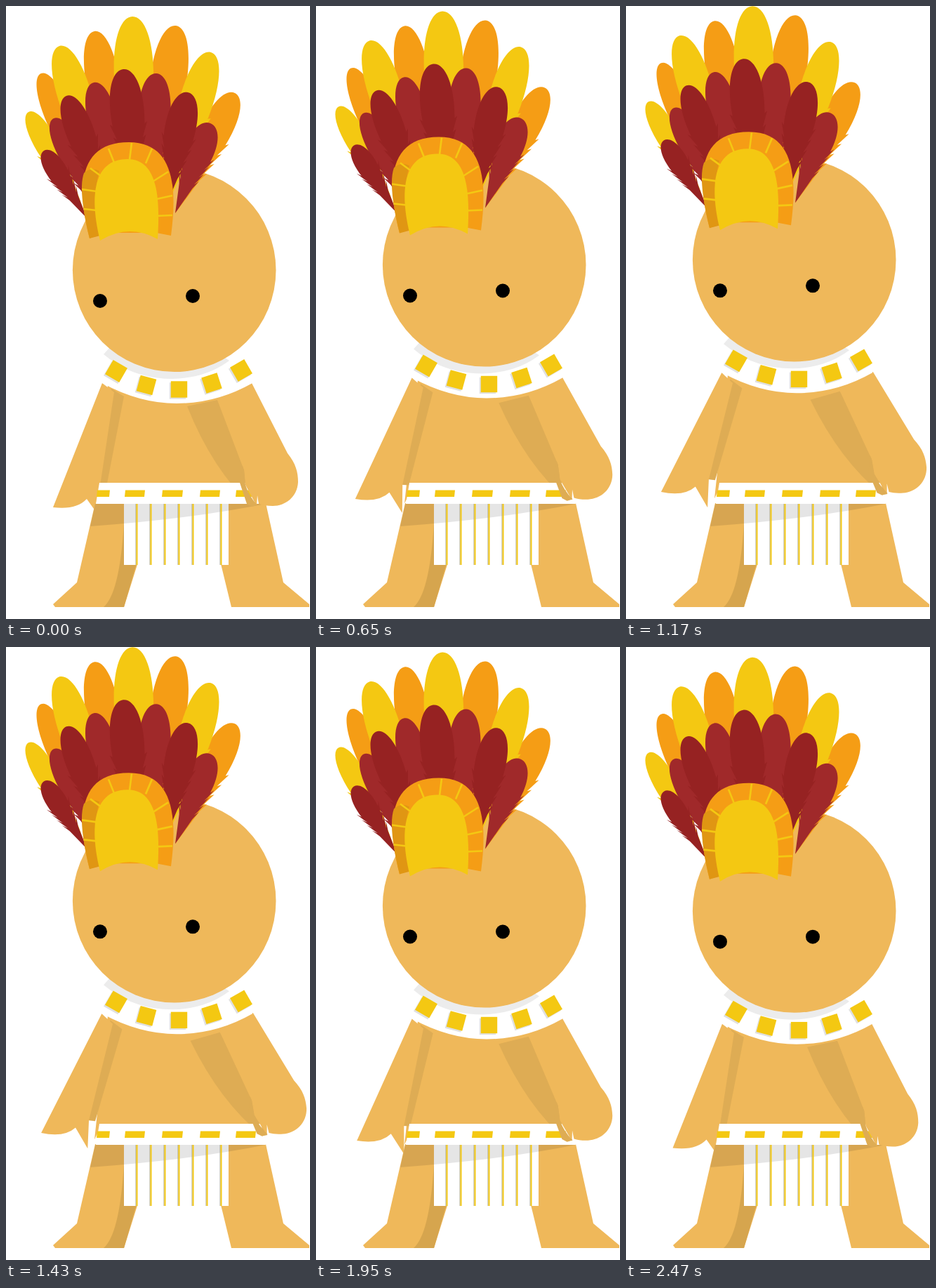
Animation, 433 px wide and 873 px high, one loop 2.6 s. Source, as an HTML page:

```html
<!DOCTYPE html>
<html lang="en">
<head>
<meta charset="utf-8">
<title>Breathing figure</title>
<style>
  html, body { margin: 0; width: 100%; height: 100%; overflow: hidden; background: #fff; }
  svg { display: block; width: 100%; height: 100%; }
  .skin { fill: #efb85a; }
  .dark { fill: #deac54; }
  .white { fill: #fff; }
  .gold { fill: #f4c812; }
  .orange { fill: #f59d15; }
  .grey { fill: #e0e0e0; }
</style>
</head>
<body>
<svg viewBox="0 0 433 873">
  <g class="lift">
    <path class="skin" d="M145 540H343L352 690L340 700H134L126 716Z"/>
    <g class="left">
      <path class="dark" d="M150 545L168 556L142 690L131 690Z"/>
      <path class="skin" d="M137 537L67 714Q100 718 115 702L135 730L133 690L154 550Z"/>
    </g>
    <path class="right dark" d="M258 570L301 561L345 661L357 712H350Q294 660 258 570Z"/>
  </g>

  <path class="skin" d="M127 708H190V786L168 856H70L67 852L101 821Z"/>
  <path class="skin" d="M300 708H370L395 821L432 852V856H321L300 770Z"/>
  <path fill="#d6a54e" d="M168 736Q162 836 139 856H168L190 780Z"/>
  <path class="white" d="M168 708H317V796H168Z"/>
  <path opacity=".1" d="M127 709H370Q260 731 120 741Z"/>
  <g id="stripes"></g>
  <path class="white" d="M133 679H363L370 709H128Z"/>
  <g id="dashes" class="gold"></g>

  <g class="lift">
    <g class="right">
      <path class="skin" d="M350 537L401 637C413 652 416 664 416 678C415 699 398 712 380 712Q368 712 360 709L358 697L357 712L341 682L339 661L301 561L310 535Z"/>
      <path class="dark" d="M337 655L339 661L341 682Q346 698 358 711L350 713L343 709L333 679Z"/>
    </g>
    <path class="white" d="M137 537Q190 566 243 566Q300 566 351 537L338 495H150Z"/>
    <path fill="#ececec" d="M148 486L139 496Q180 531 237 531Q285 530 318 505L308 498Z"/>
    <g id="beads"></g>
    <circle class="skin" cx="239.7" cy="376.3" r="144.8"/>
    <circle cx="134" cy="420" r="10"/>
    <circle cx="266" cy="413" r="10"/>
    <g id="feathers"></g>
    <path class="orange" d="M119 331C98 250 108 194 175 194C240 194 244 260 235 327L214 323H135Z"/>
    <path fill="#e09613" d="M119 331C108 285 105 255 111 238Q121 229 133 235C125 262 128 300 134 327Z"/>
    <path stroke="#f4c812" stroke-width="2.6" d="M108 261L129 264M111 289L129 291M120 231L135 242M146 203L154 223M179 195L176 219M208 203L199 224M231 236L209 250M237 270L214 275M237 298L214 299"/>
    <path class="gold" d="M134 334C118 270 125 218 173 218C215 218 220 270 216 332Q175 309 134 334Z"/>
  </g>
</svg>
<script>
const $ = id => document.getElementById(id);
const all = (name, value) =>
  document.querySelectorAll('.' + name).forEach(el => el.setAttribute('transform', value));

// A feather points from its base to its tip, with barbs along both edges.
function feather([tx, ty, w], i, fill) {
  const bx = 115 + i * 18, by = 302 - i;
  const len = Math.hypot(tx - bx, ty - by);
  const angle = Math.atan2(ty - by, tx - bx) * 180 / Math.PI;
  const edge = u => w / 2 * u / .6;
  const barbs = side => [.3, .39, .48, .57].map(u =>
    `L${u * len} ${side * edge(u)}L${u * len + 13} ${side * (edge(u) + 5)}L${(u + .045) * len} ${side * edge(u)}`);
  const back = [.57, .48, .39, .3].map(u =>
    `L${(u + .045) * len} ${edge(u)}L${u * len + 13} ${edge(u) + 5}L${u * len} ${edge(u)}`);
  return `<path fill="${fill}" transform="translate(${bx} ${by}) rotate(${angle})" d="M0 0${barbs(-1).join('')}
    L${.62 * len} ${-w / 2}C${.85 * len} ${-w * .6} ${len} ${-w * .36} ${len} 0
    C${len} ${w * .36} ${.85 * len} ${w * .6} ${.62 * len} ${w / 2}${back.join('')}Z"/>`;
}

// Every second feather lies behind its neighbours.
function fan(tips, front, behind, parity) {
  const row = (odd, fill) => tips.map((tip, i) => i % 2 === odd ? feather(tip, i, fill) : '').join('');
  return row(1 - parity, behind) + row(parity, front);
}

$('feathers').innerHTML =
  fan([[32, 151, 31], [50, 96, 36], [76, 57, 46], [126, 36, 46],
       [180, 15, 54], [242, 28, 50], [292, 66, 46], [326, 124, 42]], '#f4c812', '#f59d15', 0) +
  fan([[54, 206, 28], [68, 160, 32], [86, 128, 38], [125, 109, 40],
       [167, 90, 46], [214, 96, 44], [259, 123, 42], [291, 167, 40]], '#962222', '#a0292a', 0);

$('beads').innerHTML = [[157, 520, 30], [200, 540, 15], [246.5, 546, 0], [293, 537, -18], [335, 519, -30]]
  .map(([x, y, a]) => ['grey', 'gold'].map((c, k) =>
    `<rect class="${c}" x="-11.7" y="-11.7" width="23.4" height="23.4"
      transform="translate(${x - 2 + 2 * k} ${y + 2 - 2 * k}) rotate(${a})"/>`).join('')).join('');

for (let x = 185; x < 310; x += 20)
  $('stripes').innerHTML += `<path fill="#aaa68a" d="M${x - .5} 709h1v87h-1z"/><path class="gold" d="M${x + .5} 709h2v87h-2z"/>`;

$('dashes').innerHTML = [[130, 18], [170, 28], [223, 29], [277, 28], [328, 28]]
  .map(([x, w]) => `<path d="M${x} 689.5h${w}l-1 9.5h${-w}z"/>`).join('');

const LOOP = 2600, STEP = 130;
function draw(now) {
  const t = Math.floor(now % LOOP / STEP) * STEP;
  const breath = (1 - Math.cos(2 * Math.PI * t / LOOP)) / 2;
  const swing = t < LOOP / 2 ? breath ** .65 : breath;
  all('lift', `translate(0 ${-15 * breath})`);
  all('left', `rotate(${5.5 * swing} 137 530)`);
  all('right', `rotate(${-4.3 * breath} 335 510)`);
  requestAnimationFrame(draw);
}
draw(0);
</script>
</body>
</html>
```
